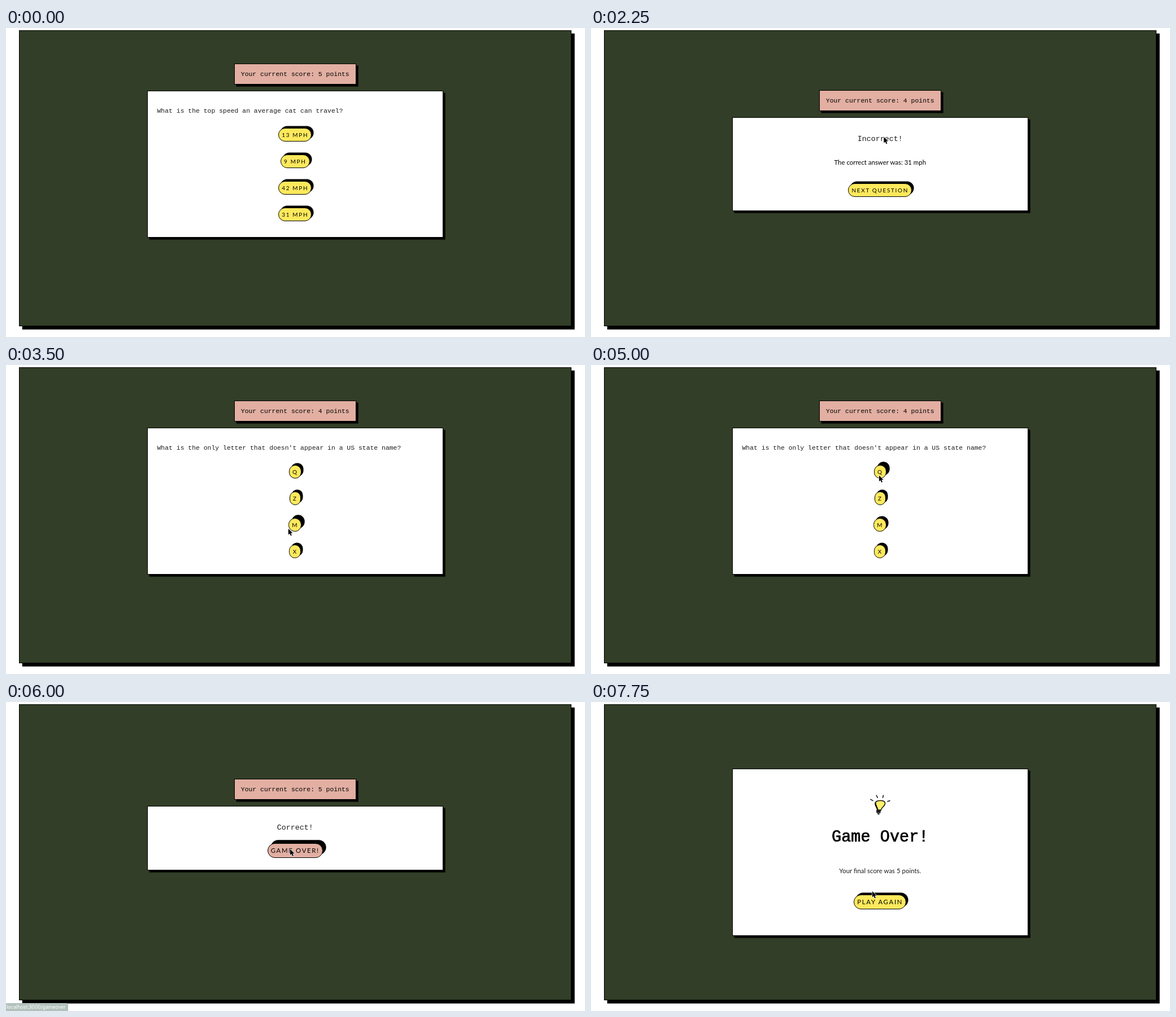
An HTML page for the animation above (8000 ms loop, 1025x547 px).

```html
<!DOCTYPE html>
<html lang="en">
<head>
<meta charset="utf-8">
<title>Quiz</title>
<style>
  html, body { margin: 0; width: 100%; height: 100%; overflow: hidden; background: #fff; }
  #stage { position: absolute; left: 0; top: 0; width: 1025px; height: 547px; overflow: hidden; }
  #stage div, #stage svg { position: absolute; box-sizing: border-box; }
  .panel, .card, .score { border: 1px solid #000; }
  .panel { left: 23px; top: 4px; width: 978px; height: 524px; background: #323e27; box-shadow: 5.7px 5.7px #000; }
  .card { left: 250px; width: 523.5px; background: #fff; box-shadow: 3.6px 3.6px #000; }
  .score { left: 404px; width: 215.5px; height: 37px; background: #e2afa2; box-shadow: 3.6px 3.6px #000; }
  .text { left: 0; width: 1023.5px; height: 40px; line-height: 40px; text-align: center; white-space: pre; font: 11.43px/40px Lato, sans-serif; color: #000; }
  .mono { font-family: "Liberation Mono", monospace; }
  .question { left: 267.5px; text-align: left; color: #1c1c1c; }
  .verdict { font-size: 13.37px; color: #1c1c1c; }
  .title { font-size: 28.57px; -webkit-text-stroke: .7px #000; }
  .final { color: #1c1c1c; }
  .row { left: 0; width: 1023.5px; display: flex; justify-content: center; }
  .row span { box-sizing: border-box; height: 24px; padding: 0 5.2px; border: 1px solid #000; border-radius: 13px;
    background: #fee95c; box-shadow: 3.6px -3.6px #000; font: 10px/22px Lato, sans-serif; letter-spacing: 1.65px; white-space: pre; color: #000; }
  .row.link span { height: 26px; font-size: 11.43px; line-height: 24px; }
  .row.hover span { box-shadow: 5.7px -5.7px #000; }
  .row.pressed span { background: #e2afa2; }
  #status { left: 0; top: 533px; width: 110px; height: 14px; padding-left: 1px; border-radius: 0 3px 0 0; background: #b3c1bc;
    color: #fff; font: 8.6px/15px Inter, sans-serif; white-space: pre; }
  #cursor { left: 0; top: 0; overflow: visible; }
</style>
</head>
<body>
<div id="stage">
  <div class="panel"></div>
  <div id="scenes"></div>
  <div id="status">localhost:3000/gameover</div>
  <svg id="cursor" width="10" height="15">
    <path d="M0 0V10.6L2.5 8.4 4.2 12.4 6 11.6 4.3 7.7H7.6Z" stroke="#fff" stroke-width="1.3" stroke-linejoin="round" paint-order="stroke"/>
  </svg>
</div>
<script>
const LOOP = 8000;
const byId = id => document.getElementById(id);

const text = (cls, middle, str) => `<div class="text ${cls}" style="top:${middle - 20}px">${str}</div>`;
const card = (top, height) => `<div class="card" style="top:${top}px;height:${height}px"></div>`;
const score = (top, points) =>
  `<div class="score" style="top:${top}px"></div>` + text('mono', top + 18.5, `Your current score: ${points} points`);
const button = (top, label, cls = '') => `<div class="row ${cls}" style="top:${top}px"><span>${label}</span></div>`;

const quiz = (points, question, answers) =>
  score(63, points) + card(111, 260) + text('mono question', 147, question) +
  answers.map((label, i) => button(177 + Math.round(i * 47.1), label)).join('');

const bulb = `<svg id="bulb" style="left:490px;top:160px" width="44" height="44" fill="none" stroke="#111" stroke-width="1.5" stroke-linecap="round">
  <path d="M5 12.3L9 14.6M15.3 5.2L17.3 9.4M27.6 5.2L26.5 9.2M35 16L39 14.8"/>
  <path d="M16.6 31C16.8 27 13 24.5 13 20.3C13 15.5 17 14.6 21.5 14.6C27 14.4 30.8 15.5 30.6 19.6C30.4 24.5 24.2 26.5 23.3 31.2Z" fill="#fdf16a"/>
  <path d="M13.6 18.5C13.5 24 17.4 26 17.3 30.6" stroke-width="2"/>
  <path d="M16 32.6L22.2 33M16.2 35L21.6 35.6" stroke-width="2.3"/>
  <path d="M18 37.8L19.8 38.2" stroke-width="2"/>
</svg>`;

const scenes = {
  speed: quiz(5, 'What is the top speed an average cat can travel?', ['13 MPH', '9 MPH', '42 MPH', '31 MPH']),
  wrong: score(110, 4) + card(158, 166) + text('mono verdict', 197.3, 'Incorrect!') +
    text('', 237.5, 'The correct answer was: 31 mph') + button(275, 'NEXT QUESTION'),
  letter: quiz(4, "What is the only letter that doesn't appear in a US state name?", ['Q', 'Z', 'M', 'X']),
  right: score(136, 5) + card(184, 114) + text('mono verdict', 223, 'Correct!') + button(250, 'GAME OVER!', 'link'),
  end: card(118, 296) + bulb + text('mono title', 240.3, 'Game Over!') +
    text('final', 299, 'Your final score was 5 points.') + button(341, 'PLAY AGAIN', 'link')
};

// time, scene, cursor x, cursor y, hovered button
const steps = [
  [0, 'speed', -50, -50],
  [750, 'speed', 625.8, 149],
  [1000, 'speed', 624.2, 149],
  [1500, 'speed', 518, 193.6, 0],
  [1750, 'speed', 518.4, 192.8, 0],
  [2250, 'wrong', 518.4, 192.8],
  [2500, 'wrong', 517.4, 201],
  [2750, 'wrong', 490.5, 307],
  [3000, 'wrong', 493.8, 299.5, 0],
  [3250, 'wrong', 499.8, 289.8, 0],
  [3500, 'letter', 499.8, 289.8, 2],
  [4250, 'letter', 502.3, 276.8, 2],
  [4500, 'letter', 506.6, 215.5],
  [4750, 'letter', 509.6, 199.5, 0],
  [5000, 'letter', 510, 195.5, 0],
  [5250, 'right', 510, 195.5],
  [5500, 'right', 508.6, 205],
  [5750, 'right', 503, 257, 0],
  [6000, 'right', 503, 260.5, 0],
  [6250, 'end', 503, 260.5],
  [7500, 'end', 500.8, 274.8],
  [7750, 'end', 498, 335]
];

byId('scenes').innerHTML = Object.entries(scenes).map(([name, html]) => `<div id="${name}">${html}</div>`).join('');

function draw(now) {
  const t = now % LOOP;
  const [, scene, x, y, hovered] = steps.findLast(step => step[0] <= t);
  const pressed = t >= 6000 && t < 6250;
  for (const name in scenes) byId(name).style.display = name === scene ? '' : 'none';
  byId(scene).querySelectorAll('.row').forEach((row, i) => {
    row.classList.toggle('hover', i === hovered);
    row.classList.toggle('pressed', pressed);
  });
  byId('bulb').style.display = t >= 6500 ? '' : 'none';
  byId('status').style.display = pressed ? '' : 'none';
  byId('cursor').style.transform = `translate(${x}px, ${y}px)`;
}

const start = performance.now();
function tick() {
  draw(performance.now() - start);
  requestAnimationFrame(tick);
}
tick();
</script>
</body>
</html>
```
